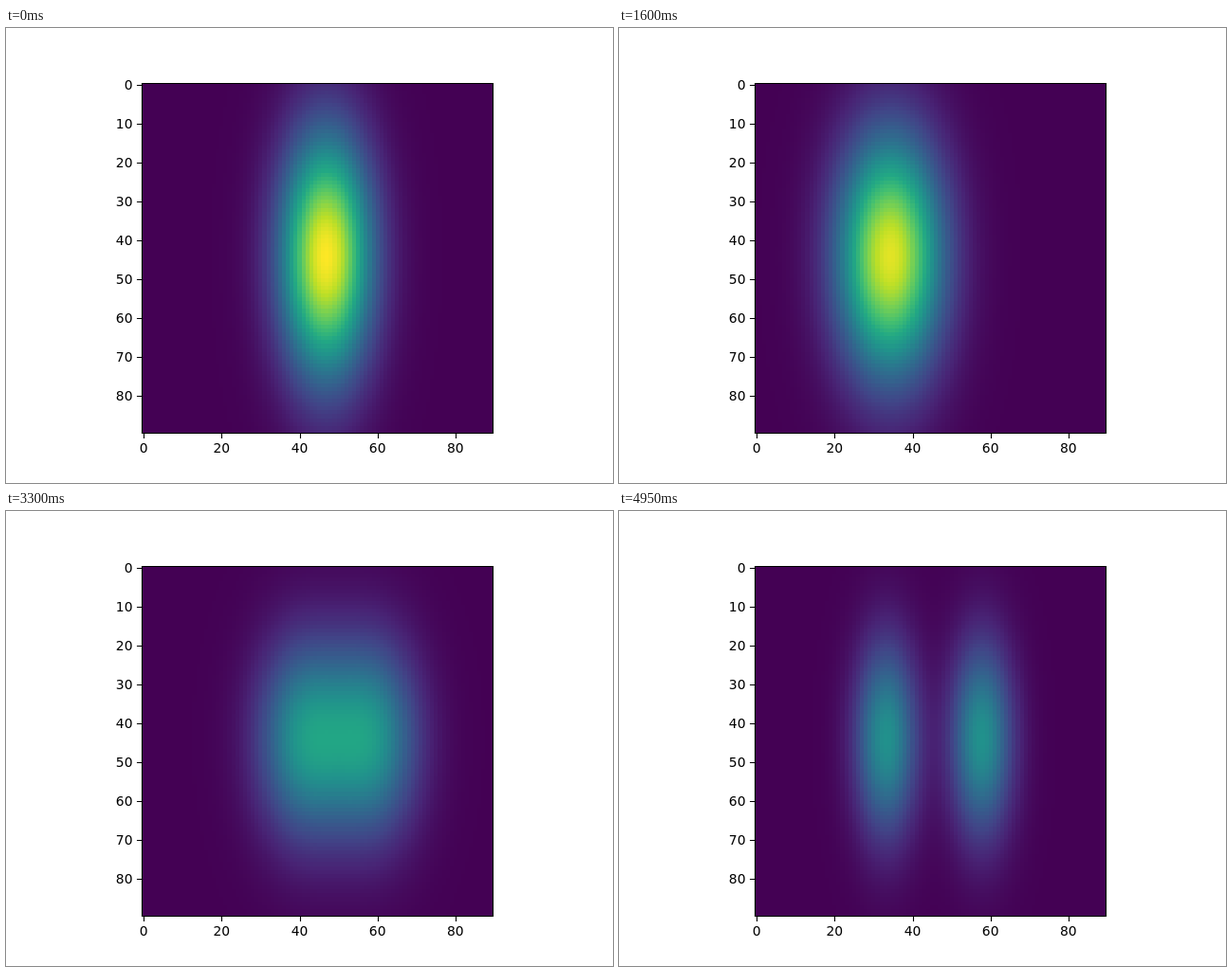
Write an HTML page with a canvas that moves like this. It is 640 px wide and 480 px high and loops after 5000 ms.

```html
<!DOCTYPE html>
<html lang="en">
<head>
<meta charset="utf-8">
<title>Two drifting Gaussians</title>
<style>
  html, body { margin: 0; width: 100%; height: 100%; overflow: hidden; background: #fff; }
  #stage { position: relative; width: 640px; height: 480px; overflow: hidden; }
  canvas { position: absolute; left: 143px; top: 58px; width: 370px; height: 370px; }
  svg { position: absolute; left: 0; top: 0; }
  text { font: 13.89px "DejaVu Sans", sans-serif; fill: #000; }
  path { stroke: #000; stroke-width: 1.11; fill: none; }
</style>
</head>
<body>
<div id="stage">
  <canvas id="heat" width="370" height="370"></canvas>
  <svg id="axes" width="640" height="480" viewBox="0 0 640 480"></svg>
</div>
<script>
const N = 90, STEP = 50, STEPS = 100;
const LEFT = 143.2, TOP = 57.6, CELL = 369.6 / N;

// Viridis at even steps from 0 to 1
const STOPS = [
  [68, 1, 84], [72, 36, 117], [65, 68, 135], [53, 95, 141], [42, 120, 142], [33, 145, 140],
  [34, 168, 132], [68, 191, 112], [122, 209, 81], [189, 223, 38], [253, 231, 37]
];

// Step, horizontal spread, vertical spread
const SPREAD = [
  [0, 8.2, 21.7], [14, 7.5, 17.7], [26, 8.5, 22], [32, 9, 21.4], [41, 9, 18.5],
  [53, 9.3, 22.5], [66, 8.4, 17.6], [77, 9.2, 20], [86, 9.6, 19.3], [99, 5.6, 17.3]
];

const svg = document.getElementById("axes");
const ctx = document.getElementById("heat").getContext("2d");
const grid = document.createElement("canvas");
grid.width = grid.height = N;
const gridCtx = grid.getContext("2d");
const image = gridCtx.createImageData(N, N);
ctx.imageSmoothingEnabled = false;

function add(name, attrs, label) {
  const el = document.createElementNS("http://www.w3.org/2000/svg", name);
  for (const key in attrs) el.setAttribute(key, attrs[key]);
  if (label !== undefined) el.textContent = label;
  svg.appendChild(el);
}

function drawAxes() {
  const snap = v => Math.floor(v + 0.5) + 0.5;
  let d = "M143.5 58.5H513.5V427.5H143.5Z";
  for (let v = 0; v < N; v += 20) {
    const x = LEFT + (v + 0.5) * CELL;
    d += `M${snap(x)} 427.5V432.5`;
    add("text", { x, y: 448, "text-anchor": "middle" }, v);
  }
  for (let v = 0; v < N; v += 10) {
    const y = snap(TOP + (v + 0.5) * CELL);
    d += `M143.5 ${y}H138.5`;
    add("text", { x: 133.5, y: y + 4.5, "text-anchor": "end" }, v);
  }
  add("path", { d, "stroke-linecap": "square" });
}

function spread(step) {
  let i = 0;
  while (i < SPREAD.length - 2 && step > SPREAD[i + 1][0]) i++;
  const a = SPREAD[i], b = SPREAD[i + 1];
  const u = (step - a[0]) / (b[0] - a[0]);
  const e = u * u * (3 - 2 * u);
  return [a[1] + (b[1] - a[1]) * e, a[2] + (b[2] - a[2]) * e];
}

const bell = (d, s) => Math.exp(-d * d / (2 * s * s));

function setColour(at, value) {
  const p = Math.min(Math.max(value, 0), 1) * 10;
  const i = Math.min(Math.floor(p), 9);
  for (let k = 0; k < 3; k++) {
    image.data[at + k] = STOPS[i][k] + (STOPS[i + 1][k] - STOPS[i][k]) * (p - i);
  }
  image.data[at + 3] = 255;
}

function draw(step) {
  const t = step + 1;
  const [sx, sy] = spread(step);
  const x1 = 45.1 + 13.5 * Math.sin(0.145 * t);
  const x2 = 45.1 + 13.5 * Math.sin(0.115 * t);
  const row = [];
  for (let x = 0; x < N; x++) row.push((bell(x - x1, sx) + bell(x - x2, sx)) / 2);
  for (let y = 0; y < N; y++) {
    const fall = bell(y - 43.9, sy);
    for (let x = 0; x < N; x++) setColour((y * N + x) * 4, row[x] * fall);
  }
  gridCtx.putImageData(image, 0, 0);
  ctx.drawImage(grid, 0, 0, 370, 370);
}

const start = performance.now();
let shown = -1;

function tick() {
  const step = Math.floor((performance.now() - start) / STEP) % STEPS;
  if (step !== shown) draw(shown = step);
  requestAnimationFrame(tick);
}

drawAxes();
tick();
</script>
</body>
</html>
```
